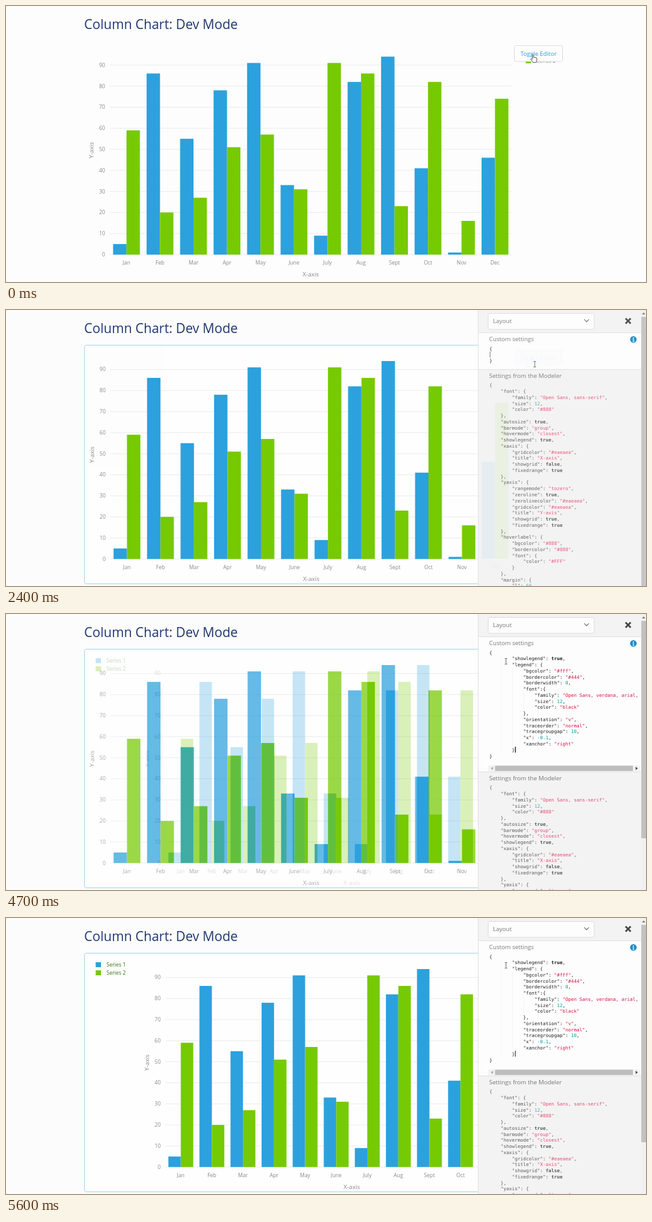
Animation of 1024x443 px, one loop 8000 ms. Source, as an HTML page:

```html
<!DOCTYPE html>
<html lang="en">
<head>
<meta charset="utf-8">
<title>Column Chart: Dev Mode</title>
<style>
  html, body { margin: 0; width: 100%; height: 100%; overflow: hidden; background: #fdfdfd; }
  svg { display: block; width: 100vw; height: 100vh; }
  text { font: 9.55px "Open Sans", sans-serif; fill: #777; white-space: pre; }
  .title { font-size: 21px; fill: #1f3672; }
  .tick { font-size: 8.44px; fill: #888; }
  .axis { font-size: 9.7px; fill: #888; }
  .mid { text-anchor: middle; }
  .end { text-anchor: end; }
  .code { font: 7.475px "DejaVu Sans Mono", monospace; fill: #222; }
  .str { fill: #d14; }
  .num { fill: #099; }
  .bool { font-weight: bold; }
  .dim { opacity: .72; }
</style>
</head>
<body>
<svg id="stage" viewBox="0 0 1024 443"></svg>
<script>
const LOOP = 8000, STEP = 100, STEPS = 10;
const BLUE = '#2ca1dd', GREEN = '#76ca02';
const MONTHS = 'Jan Feb Mar Apr May June July Aug Sept Oct Nov Dec'.split(' ');
const SERIES = [
  { color: BLUE, data: [5, 86, 55, 78, 91, 33, 9, 82, 94, 41, 1, 46] },
  { color: GREEN, data: [59, 20, 27, 51, 57, 31, 91, 86, 23, 82, 16, 74] },
];

const MODELER = `{
    "font": {
        "family": "Open Sans, sans-serif",
        "size": 12,
        "color": "#888"
    },
    "autosize": true,
    "barmode": "group",
    "hovermode": "closest",
    "showlegend": true,
    "xaxis": {
        "gridcolor": "#eaeaea",
        "title": "X-axis",
        "showgrid": false,
        "fixedrange": true
    },
    "yaxis": {
        "rangemode": "tozero",
        "zeroline": true,
        "zerolinecolor": "#eaeaea",
        "gridcolor": "#eaeaea",
        "title": "Y-axis",
        "showgrid": true,
        "fixedrange": true
    },
    "hoverlabel": {
        "bgcolor": "#888",
        "bordercolor": "#888",
        "font": {
            "color": "#FFF"
        }
    },
    "margin": {
        "l": 60,`;

const EMPTY = '{\n\n}';
const CUSTOM = `{
        "showlegend": true,
        "legend": {
            "bgcolor": "#fff",
            "bordercolor": "#444",
            "borderwidth": 0,
            "font":{
                "family": "Open Sans, verdana, arial,
                "size": 12,
                "color": "black"
            },
            "orientation": "v",
            "traceorder": "normal",
            "tracegroupgap": 10,
            "x": -0.1,
            "xanchor": "right"
        }
}`;

const rect = (x, y, w, h, fill, more = '') =>
  `<rect x="${x}" y="${y}" width="${w}" height="${h}" fill="${fill}" ${more}/>`;
const path = (d, stroke, width = 1, fill = 'none') =>
  `<path d="${d}" stroke="${stroke}" stroke-width="${width}" fill="${fill}"/>`;
const text = (x, y, str, cls = '', more = '') =>
  `<text x="${x}" y="${y}" class="${cls}" ${more}>${str}</text>`;
const move = (x, y, body) => `<g transform="translate(${x} ${y})">${body}</g>`;

function code(src, y, cls = '') {
  const token = /("[^"]*"(?=:))|("[^"]*"?)|(true|false)|(-?\d[\d.]*)/g;
  const paint = line => line.replace(token, (m, key, str, bool) =>
    key ? m : `<tspan class="${str ? 'str' : bool ? 'bool' : 'num'}">${m}</tspan>`);
  const lines = src.split('\n').map((line, i) =>
    text(773.5, (y + 2.6 + i * 9.76).toFixed(2), paint(line), 'code'));
  return `<g class="${cls}">${lines.join('')}</g>`;
}

// Twelve month groups starting at `left`, each `pitch` wide
function chart(left, pitch) {
  const zero = 399, unit = 3.38, bar = pitch * .4;
  let out = '';
  for (let v = 0; v <= 90; v += 10) {
    const y = zero - v * unit;
    out += rect(left, y - .5, pitch * 12, 1, '#ebebeb') + text(left - 7.3, y + 3, v, 'tick end');
  }
  MONTHS.forEach((name, i) => {
    const x = left + pitch * (i + .5);
    SERIES.forEach((s, j) => {
      const h = s.data[i] * unit;
      out += rect(x + (j - 1) * bar, zero - h, bar, h, s.color);
    });
    out += text(x, 415, name, 'tick mid');
  });
  return out + text(left + pitch * 6, 434.3, 'X-axis', 'axis mid') +
    text(0, 0, 'Y-axis', 'axis mid', `transform="translate(${left - 25.8} 231.5) rotate(-90)"`);
}

function legend(x, y, color) {
  return SERIES.map((s, i) => rect(x, y + i * 13 - 4, 8.5, 8, s.color) +
    text(x + 17.3, y + i * 13 + 3, `Series ${i + 1}`, 'tick', `style="fill:${color}"`)).join('');
}

const button = fill =>
  rect(813.5, 63.5, 77, 25.5, fill, 'rx="2" stroke="#dcdcdc"') +
  text(852, 79.7, 'Toggle Editor', 'mid', 'style="fill:#2a9bd8"');

const hand = move(839, 77.5, path(
  'M3.2 8V1.2q0-1 .9-1t.9 1V5q.2-.7 1-.6t.9.9q.2-.6 1-.5t.8 1q.3-.5 1-.3t.6 1V9.5L9.2 13H4.3L1 8.5q-.7-1 .1-1.5t1.3.3z',
  '#333', .8, '#fff'));
const beam = (x, y) => move(x, y, path('M-2-4.5H-.6L0-4 .6-4.5H2M0-4V4M-2 4.5H-.6L0 4 .6 4.5H2', '#444', .8));

const title = text(125, 37.3, 'Column Chart: Dev Mode', 'title');
const back = color => rect(0, 0, 1024, 443, color);

const page = fill => back('#fdfdfd') + title + chart(166, 53.6) +
  legend(831.5, 75, '#888') + button(fill) + hand;

const frame = body => back('#fcfcfc') + title +
  rect(125.5, 56.5, 720, 383, '#fefefe', 'rx="3" stroke="#a3d3ea"') + body;
const plot = frame(move(.8, .7, chart(166, 53.6)));
const moved = frame(move(0, .7, chart(254.8, 49.73)) + legend(143.5, 75, '#3d7313'));

// `split` is the line between the custom and the modeler settings
function panel(src, split, thumb) {
  return rect(755, 0, 269, 443, '#f3f3f3') +
    rect(756, 37, 260, split - 37, '#fdfdfd') +
    path(`M755.5 0V443M756 36.5H1016M756 ${split + .5}H1016`, '#e0e0e0') +
    rect(771.5, 5.5, 169.5, 25.5, '#fdfdfd', 'rx="2" stroke="#dcdcdc"') +
    text(779, 21.4, 'Layout') +
    path('M925.3 15.2L929 18.9 932.7 15.2', '#666', 1.1) +
    path('M991.3 13.5L999.5 21.7M999.5 13.5L991.3 21.7', '#484848', 2.8) +
    text(773, 50, 'Custom settings') +
    `<circle cx="1003.8" cy="47.2" r="5.2" fill="#168bc9"/>` +
    rect(1003, 44, 1.8, 1.5, '#fff') + path('M1002.5 46.8H1004V50M1002.3 50.2H1005.5', '#fff', 1.1) +
    text(773, split + 14, 'Settings from the Modeler') +
    code(MODELER, split + 25.7, 'dim') + code(src, 62) +
    rect(1016, 0, 8, 443, '#f1f1f1') + rect(1016.5, 11, 7.5, thumb, '#c1c1c1') +
    path('M1017.5 7L1020.2 4 1023 7z', 'none', 0, '#777');
}

const caret = (x, y, color, w = 1) => rect(x, y, w, 9.5, color);

const openPanel = panel(EMPTY, 95, 432) + caret(774, 67, '#777') + beam(846, 87);

const filledPanel = color => panel(CUSTOM, 253, 349) +
  path('M792.5 67V223M810.5 86V213M828.5 125V154', '#f0f0f0', .7) +
  rect(772, 243, 242, 9.5, '#f1f1f1') + rect(782.5, 243.5, 220.5, 8.5, '#bdbdbd') +
  path('M779 245.5L776 247.8 779 250z', 'none', 0, '#999') +
  path('M1007.5 245.2L1010.8 247.8 1007.5 250.4z', 'none', 0, '#444') +
  caret(814.3, 213, color, 1.4) + beam(800, 76);

const SCENES = [
  { at: 0, body: page('#fdfdfd') },
  { at: 500, body: page('#e1e1e1') },
  { at: 1900, body: plot + openPanel },
  { at: 3300, body: plot + filledPanel('#111') },
  { at: 4700, body: moved + filledPanel('#177a2a') },
];

const stage = document.getElementById('stage');
stage.innerHTML = SCENES.map(s => `<g>${s.body}</g>`).join('');

// Each scene fades over the one below in ten cubic ease-out steps
SCENES.forEach(({ at }, i) => {
  if (!i) return;
  const keys = [{ offset: 0, opacity: 0, easing: 'step-end' }];
  for (let k = 0; k < STEPS; k++) {
    keys.push({
      offset: (at + k * STEP) / LOOP,
      opacity: 1 - (1 - (k + 1) / STEPS) ** 3,
      easing: 'step-end',
    });
  }
  keys.push({ offset: 1, opacity: 1 });
  stage.children[i].animate(keys, { duration: LOOP, iterations: Infinity });
});
</script>
</body>
</html>
```
